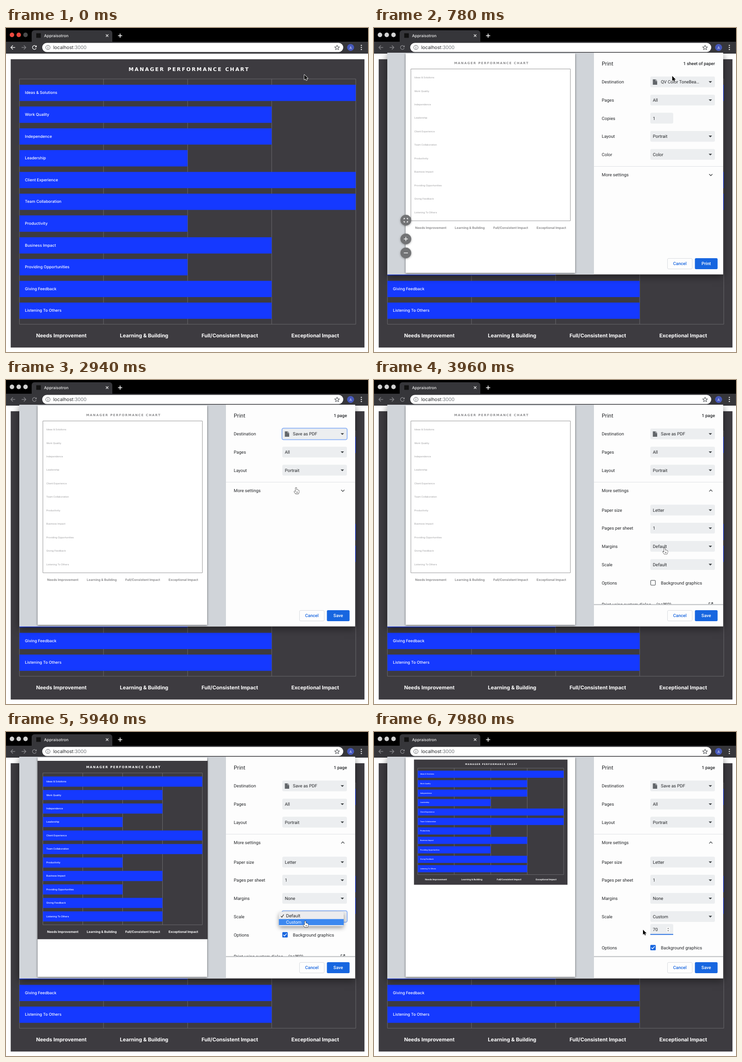
Recreate the animation shown at these times as an HTML page with a canvas. Size 790 by 708 pixels, loop 8000 ms.

```html
<!DOCTYPE html>
<html lang="en">
<head>
<meta charset="utf-8">
<title>Print dialog</title>
<style>
html, body { margin: 0; width: 100%; height: 100%; overflow: hidden; background: #fff; }
canvas { display: block; width: 790px; height: 708px; }
</style>
</head>
<body>
<canvas id="stage" width="790" height="708"></canvas>
<script>
const ctx = document.getElementById('stage').getContext('2d');
const LOOP = 8000, STEP = 60;
const UI = 'Roboto, sans-serif', SYS = 'Inter, sans-serif', WIDE = '"DejaVu Sans", sans-serif';
const BLUE = '#1539ff', ACCENT = '#1766e0', INK = '#25272a', PANE = '#d0d4d9';

const ROWS = [
  ['Ideas & Solutions', 4], ['Work Quality', 3], ['Independence', 3], ['Leadership', 2],
  ['Client Experience', 4], ['Team Collaboration', 4], ['Productivity', 2], ['Business Impact', 3],
  ['Providing Opportunities', 2], ['Giving Feedback', 3], ['Listening To Others', 3]
];
const LEVELS = ['Needs Improvement', 'Learning & Building', 'Full/Consistent Impact', 'Exceptional Impact'];
const PRINTERS = ['QV Color ToneBeam T318ks (DB7F29)', 'Edgar (Tandrel B&W)', 'Save as PDF',
  'Save to Mellow Vault', 'See more...'];

// When things happen, in ms
const AT = {
  sheet: 60, settings: 360, preview: 720, destOpen: 1200, destPick: 2100, pdfReady: 2400,
  more: 3060, check: 4380, colorReady: 4560, scaleOpen: 5460, scalePick: 6180,
  selectText: 6480, digit1: 7320, digit2: 7440, rescale: 7620, done: 7920
};
// time, x, y of the pointer tip
const PATH = [
  [0, 651, 102], [660, 651, 102], [1080, 650, 116], [1320, 650, 116], [1740, 650, 139],
  [2520, 650, 139], [2940, 633, 235], [3540, 633, 235], [4260, 635, 446], [4740, 635, 446],
  [5160, 656, 400], [5220, 657, 401], [5640, 657, 401], [5940, 653, 413], [6240, 653, 413],
  [6840, 587, 432], [LOOP, 587, 432]
];

const clamp = v => Math.max(0, Math.min(1, v));
const smooth = v => v * v * (3 - 2 * v);
const within = (t, a, b) => t >= a && t < b;

function rect(x, y, w, h, fill, r = 0) {
  ctx.fillStyle = fill;
  ctx.beginPath();
  ctx.roundRect(x, y, w, h, r);
  ctx.fill();
}

function frame(x, y, w, h, color, r = 0, width = 1) {
  ctx.strokeStyle = color;
  ctx.lineWidth = width;
  ctx.beginPath();
  ctx.roundRect(x, y, w, h, r);
  ctx.stroke();
}

function disc(x, y, r, fill) {
  ctx.fillStyle = fill;
  ctx.beginPath();
  ctx.arc(x, y, r, 0, Math.PI * 2);
  ctx.fill();
}

function trace(pts, close) {
  ctx.beginPath();
  pts.forEach(([x, y]) => ctx.lineTo(x, y));
  if (close) ctx.closePath();
}

function line(pts, color, width = 1) {
  trace(pts);
  ctx.strokeStyle = color;
  ctx.lineWidth = width;
  ctx.stroke();
}

function poly(pts, fill) {
  trace(pts, true);
  ctx.fillStyle = fill;
  ctx.fill();
}

function setFont(size, family, weight, spacing) {
  ctx.font = `${weight} ${size}px ${family}`;
  ctx.letterSpacing = spacing + 'px';
}

// y is the middle of the capitals
function text(s, x, y, { size = 9.6, family = UI, weight = 400, color = INK, align = 'left', spacing = 0 } = {}) {
  setFont(size, family, weight, spacing);
  ctx.textAlign = align;
  ctx.fillStyle = color;
  ctx.fillText(s, x, y + size * 0.36);
}

function clipped(x, y, w, h, draw) {
  ctx.save();
  ctx.beginPath();
  ctx.rect(x, y, w, h);
  ctx.clip();
  draw();
  ctx.restore();
}

// Chart with its grid at x, y; s scales everything but the width
function chart(x, y, w, s, filled = true) {
  const h = 536 * s;
  const ink = filled ? '#fff' : '#8d8d8f';
  if (filled) rect(x - 19 * s, y - 43 * s, w + 38 * s, h + 94 * s, '#3d3b40');
  text('MANAGER PERFORMANCE CHART', x + w / 2 + 3.2 * s, y - 21 * s,
    { size: 11 * s, family: WIDE, weight: 700, color: ink, align: 'center', spacing: 2.37 * s });
  if (filled) {
    for (let i = 1; i < 4; i++) {
      const cx = x + w * i / 4;
      line([[cx, y], [cx, y + h]], '#69686c');
    }
  }
  frame(x, y, w, h, filled ? '#69686c' : '#98989a');
  ROWS.forEach(([name, score], i) => {
    const top = y + (12.7 + 47.6 * i) * s;
    if (filled) rect(x, top, w * score / 4, 35.6 * s, BLUE);
    text(name, x + 12 * s, top + 17.4 * s,
      { size: 8.6 * s, family: SYS, weight: 500, color: filled ? '#fff' : '#a9a9ab' });
  });
  const style = { size: 11.2 * s, family: SYS, weight: 700, color: ink };
  setFont(style.size, SYS, 700, 0);
  const widths = LEVELS.map(l => ctx.measureText(l).width);
  const gap = (w - widths.reduce((a, b) => a + b)) / 8;
  let left = x;
  LEVELS.forEach((l, i) => {
    text(l, left + gap, y + h + 25 * s, style);
    left += widths[i] + gap * 2;
  });
}

function browser(active) {
  rect(0, 0, 790, 30, '#000');
  rect(0, 30, 790, 26, '#36363a');
  const lights = active ? ['#ee4b40', '#e8453b', '#4a4a4b'] : ['#d2d2d2', '#d2d2d2', '#d2d2d2'];
  lights.forEach((c, i) => disc(13 + i * 14.8, 15, 4.9, c));

  rect(56, 5, 176, 26, '#36363a', [6, 6, 0, 0]);
  rect(66, 11.5, 10, 10, '#111');
  text('Appraisotron', 83, 16.5, { size: 8.6, family: SYS, weight: 500, color: '#f0f0f0' });
  line([[218, 14], [223.4, 19.4]], '#e8e8e8', 1.3);
  line([[223.4, 14], [218, 19.4]], '#e8e8e8', 1.3);
  line([[244.5, 16.7], [253.5, 16.7]], '#fff', 1.6);
  line([[249, 12.2], [249, 21.2]], '#fff', 1.6);

  const on = active ? '#f0f0f0' : '#838387', off = '#838387';
  line([[20, 42.5], [10.8, 42.5]], on, 1.4);
  line([[15, 38], [10.6, 42.5], [15, 47]], on, 1.4);
  line([[34, 42.5], [43.2, 42.5]], off, 1.4);
  line([[39, 38], [43.4, 42.5], [39, 47]], off, 1.4);
  ctx.strokeStyle = on;
  ctx.lineWidth = 1.4;
  ctx.beginPath();
  ctx.arc(62, 42.5, 4.2, 0.4, 5.4);
  ctx.stroke();
  poly([[67, 37.5], [67, 42], [62.6, 42]], on);

  rect(79, 32.5, 657, 20, '#fff', 10);
  ctx.strokeStyle = '#55585c';
  ctx.lineWidth = 1;
  ctx.beginPath();
  ctx.arc(91.5, 42.5, 4.7, 0, Math.PI * 2);
  ctx.stroke();
  line([[91.5, 42], [91.5, 45.2]], '#55585c', 1.1);
  line([[91.5, 39.8], [91.5, 41]], '#55585c', 1.1);
  text('localhost', 103, 42.5, { size: 10.3, family: SYS });
  setFont(10.3, SYS, 400, 0);
  text(':3000', 103 + ctx.measureText('localhost').width, 42.5, { size: 10.3, family: SYS, color: '#707478' });
  const star = Array.from({ length: 10 }, (_, i) => {
    const a = i * Math.PI / 5 - Math.PI / 2, r = i % 2 ? 2.4 : 5.4;
    return [722.5 + r * Math.cos(a), 43 + r * Math.sin(a)];
  });
  trace(star, true);
  ctx.strokeStyle = '#55585c';
  ctx.stroke();
  disc(752, 42.5, 7.6, '#4759bd');
  text('A', 752, 42.7, { size: 8, color: '#e4e7ff', align: 'center' });
  [38, 42.5, 47].forEach(y => disc(775.5, y, 1.3, '#f0f0f0'));
}

function chevron(x, y, up) {
  const d = up ? -1.8 : 1.8;
  line([[x - 3.5, y - d], [x, y + d], [x + 3.5, y - d]], '#3c4043', 1.3);
}

function field(y, w = 141) {
  rect(603, y - 12, w, 23.6, '#eceef0', 3);
}

function ring(y) {
  frame(602.3, y - 12.7, 142.2, 25, '#8ab0f5', 3.5, 1.8);
}

function select(label, value, y, icon) {
  text(label, 497, y);
  field(y);
  if (icon) {
    poly([[608.5, 112.3], [615, 112.3], [618, 115.3], [618, 124], [608.5, 124]], '#62666a');
    line([[614.8, 112.3], [614.8, 115.6], [618, 115.6]], '#eceef0', 0.8);
  }
  text(value, icon ? 626 : 608.5, y);
  poly([[730.3, y - 1.8], [737.7, y - 1.8], [734, y + 2]], '#3c4043');
}

function menu(items, top, width, hover) {
  const pitch = 13.3, h = (items.length - 1) * pitch + 18;
  ctx.save();
  ctx.shadowColor = 'rgba(0,0,0,.38)';
  ctx.shadowBlur = 10;
  ctx.shadowOffsetY = 4;
  rect(595.5, top, width, h, '#ececee', 4);
  ctx.restore();
  items.forEach((item, i) => {
    const y = top + 9 + i * pitch;
    const lit = i === hover, color = lit ? '#fff' : '#232325';
    if (lit) rect(595.5, y - 6.6, width, pitch, '#3c88f0');
    text(item, 611, y, { size: 9.5, family: SYS, color, spacing: -0.15 });
    if (i === 0) line([[600, y + 0.2], [602, y + 2.8], [606, y - 3.2]], color, 1.2);
  });
}

function zoomButtons() {
  [420, 461, 491.5].forEach((y, i) => {
    ctx.save();
    ctx.shadowColor = 'rgba(0,0,0,.35)';
    ctx.shadowBlur = 4;
    ctx.shadowOffsetY = 1;
    disc(69.5, y, 11.8, '#727375');
    ctx.restore();
    if (i) {
      line([[65, y], [74, y]], '#fff', 1.4);
      if (i === 1) line([[69.5, y - 4.5], [69.5, y + 4.5]], '#fff', 1.4);
    } else {
      for (const a of [-1, 1]) for (const b of [-1, 1]) {
        line([[69.5 + a * 1.8, y + b * 4], [69.5 + a * 4, y + b * 4], [69.5 + a * 4, y + b * 1.8]], '#fff', 1.3);
      }
    }
  });
}

function preview(t) {
  const busy = t < AT.preview || within(t, AT.destPick, AT.pdfReady) ||
    within(t, AT.check, AT.colorReady) || within(t, AT.rescale, AT.done);
  if (busy) {
    text('Loading preview', 254.5, 296, { size: 11.2, color: '#55595e', align: 'center' });
    return;
  }
  ctx.save();
  ctx.shadowColor = 'rgba(0,0,0,.6)';
  ctx.shadowBlur = 4;
  ctx.shadowOffsetY = 1;
  rect(69, 55.5, 370, 479.5, '#fff');
  ctx.restore();
  if (t >= AT.done) chart(95.5, 79, 318.5, 0.434);
  else chart(80.5, 89.5, 348, 0.619, t >= AT.colorReady);
  if (t < AT.destPick) zoomButtons();
}

function advanced(t) {
  select('Paper size', 'Letter', 284.5);
  select('Pages per sheet', '1', 324);
  select('Margins', t < AT.check ? 'Default' : 'None', 363.7);
  const custom = t >= AT.scalePick;
  select('Scale', custom ? 'Custom' : 'Default', 403.4);
  const grow = smooth(clamp((t - AT.scalePick) / 240));
  if (custom) clipped(597, 418, 160, 27 * grow, () => {
    field(431.6, 50);
    const typed = t < AT.digit1 ? '100' : t < AT.digit2 ? '7' : '70';
    if (within(t, AT.selectText, AT.digit1)) rect(608, 425.5, 17.5, 12, '#b3d4fd');
    text(typed, 608.5, 431.3);
    rect(638.5, 426, 7, 11.5, '#fafafa', 2);
    poly([[640.2, 430.3], [643.8, 430.3], [642, 427.8]], '#777');
    poly([[640.2, 433.2], [643.8, 433.2], [642, 435.7]], '#777');
    rect(603, 441.6, 50, 1.7, ACCENT);
  });

  const y = 443.2 + 28 * grow;
  text('Options', 497, y);
  if (t >= AT.check) {
    rect(603, y - 6, 11.8, 11.8, ACCENT, 1.5);
    line([[605.3, y], [607.8, y + 2.6], [612.6, y - 2.8]], '#fff', 1.4);
  } else {
    frame(603.7, y - 5.3, 10.4, 10.4, '#606468', 1.5, 1.3);
  }
  text('Background graphics', 626, y + 0.3);

  const z = y + 47.5;
  text('Print using system dialog…  (⌥⌘P)', 497, z, { family: 'Roboto, "DejaVu Sans", sans-serif' });
  line([[734, z - 4], [731, z - 4], [731, z + 4], [739, z + 4], [739, z + 1]], '#3c4043', 1.1);
  line([[734.5, z + 0.5], [739, z - 4]], '#3c4043', 1.1);
  line([[736, z - 4.2], [739.2, z - 4.2], [739.2, z - 1]], '#3c4043', 1.1);
}

function settings(t) {
  const pdf = t >= AT.destPick;
  text('Print', 497, 77.3, { size: 12 });
  text(pdf ? '1 page' : '1 sheet of paper', 744, 77.5, { size: 9.5, weight: 500, align: 'right' });
  select('Destination', pdf ? 'Save as PDF' : 'QV Color ToneBea…', 118, true);
  select('Pages', 'All', 157.7);
  if (pdf) {
    select('Layout', 'Portrait', 197.2);
  } else {
    text('Copies', 497, 197.2);
    field(197.2, 50);
    text('1', 608.5, 197.2);
    select('Layout', 'Portrait', 236.9);
    select('Color', 'Color', 276.5);
  }
  const moreY = pdf ? 241.8 : 321;
  const open = smooth(clamp((t - AT.more) / 300));
  rect(480, moreY - 19, 282, 1, '#dfe1e4');
  text('More settings', 497, moreY);
  chevron(735, moreY, open > 0);
  if (open > 0) {
    clipped(480, 262, 282, 228 * open, () => advanced(t));
    rect(480, 489.8, 282, 2, `rgba(190,192,195,${open})`);
  }

  frame(640.5, 503.5, 54, 23, '#d9dce0', 2.5);
  text('Cancel', 667.5, 514.8, { weight: 500, color: ACCENT, align: 'center' });
  rect(700.3, 503, 49.5, 24, ACCENT, 2.5);
  text(pdf ? 'Save' : 'Print', 725, 514.8, { weight: 500, color: '#fff', align: 'center' });

  if (within(t, AT.destOpen, AT.more)) ring(118);
  if (within(t, AT.scaleOpen, AT.scalePick)) ring(403.4);
}

function sheet(t) {
  const p = 1 - (1 - clamp(t / 180)) ** 2;
  clipped(0, 54, 790, 654, () => {
    ctx.translate(0, -484 * (1 - p));
    ctx.save();
    ctx.shadowColor = 'rgba(0,0,0,.5)';
    ctx.shadowBlur = 16;
    ctx.shadowOffsetY = 4;
    rect(29, 54, 733, 484.5, '#fdfdfd');
    ctx.restore();
    rect(29, 54, 451, 484.5, PANE);
    if (t >= AT.settings) {
      ctx.globalAlpha = clamp((t - AT.settings + 60) / 180);
      preview(t);
      settings(t);
    }
  });
}

function pointerAt(t) {
  const i = PATH.findIndex(k => k[0] > t);
  const [t0, x0, y0] = PATH[i - 1], [t1, x1, y1] = PATH[i];
  const p = smooth((t - t0) / (t1 - t0));
  return [x0 + (x1 - x0) * p, y0 + (y1 - y0) * p];
}

function pointer(t, x, y) {
  const hand = within(t, 960, 6360);
  const shape = hand
    ? [[-1.2, 1], [0, 0], [1.2, 1], [1.2, 5], [3.2, 5], [5, 5.8], [6.6, 7], [6.6, 10], [5.2, 13.6],
       [-0.8, 13.6], [-4, 9.4], [-3.8, 8], [-2.6, 8], [-1.2, 9.6]]
    : [[0, 0], [0, 11], [2.6, 8.6], [4.2, 12.4], [6, 11.6], [4.5, 8], [7.8, 8]];
  ctx.save();
  ctx.translate(x, y);
  ctx.lineJoin = 'round';
  trace(shape, true);
  ctx.lineWidth = hand ? 1.1 : 1.6;
  ctx.strokeStyle = hand ? '#111' : '#fff';
  ctx.fillStyle = hand ? '#fff' : '#000';
  ctx.stroke();
  ctx.fill();
  if (hand) [1.4, 3.2].forEach(k => line([[k, 9], [k, 11.5]], '#222', 0.8));
  ctx.restore();
}

function draw(t) {
  rect(0, 0, 790, 708, '#fff');
  chart(29.3, 111.3, 734, 1);
  browser(t < AT.sheet);
  if (t >= AT.sheet) sheet(t);
  const [x, y] = pointerAt(t);
  const hover = top => Math.max(0, Math.floor((y + 1 - top - 2.4) / 13.3));
  if (within(t, AT.destOpen, AT.destPick)) menu(PRINTERS, 108, 210, hover(108));
  if (within(t, AT.scaleOpen, AT.scalePick)) menu(['Default', 'Custom'], 393, 141.5, hover(393));
  pointer(t, x, y);
}

ctx.textRendering = 'geometricPrecision';
const start = performance.now();
function tick() {
  const t = (performance.now() - start) % LOOP;
  draw(Math.floor(t / STEP) * STEP);
  requestAnimationFrame(tick);
}
tick();
</script>
</body>
</html>
```
